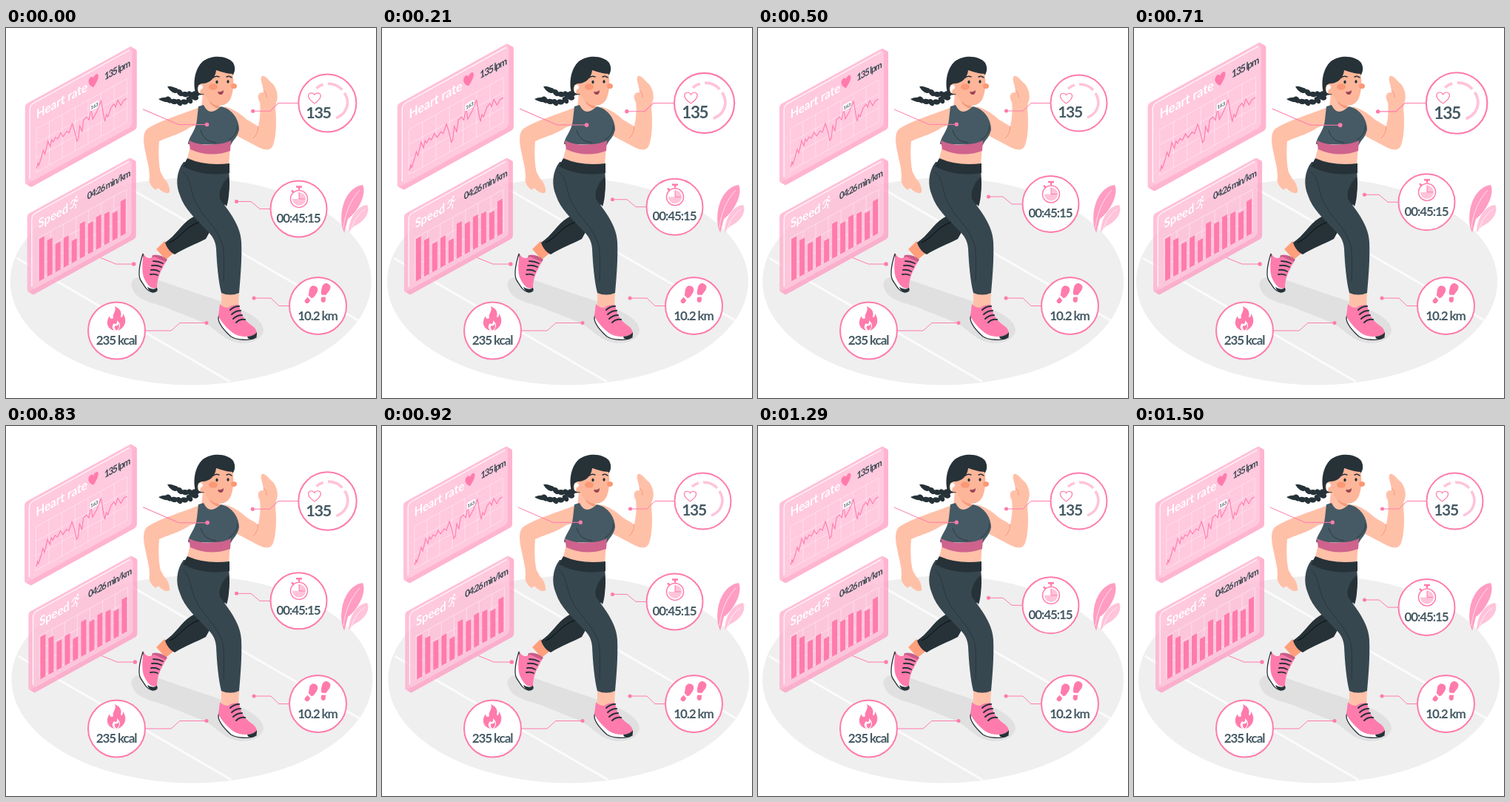
Recreate the animation shown at these times as an HTML page. Size 500 by 500 pixels, loop 1.54 s.

```html
<!DOCTYPE html>
<html lang="en">
<head>
<meta charset="utf-8">
<title>Running stats</title>
<style>
html, body { margin: 0; height: 100%; overflow: hidden; background: #fff; }
svg { display: block; width: 100%; height: 100%; }
text { font-family: Lato, "Open Sans", sans-serif; font-weight: 700; fill: #455a64; }
.title { font-size: 17px; fill: #fff; }
.value { font-size: 13px; letter-spacing: -1.3px; fill: #37474f; }
.badge text { font-size: 17px; letter-spacing: -1.1px; text-anchor: middle; }
.badge .rim { fill: #fff; stroke: #ff7bac; stroke-width: 2; }
.lead { fill: none; stroke: #ff7bac; }
.pink, .dot { fill: #ff7bac; }
.skin { fill: #ffc0a8; }
.dark { fill: #263238; }
.line { fill: none; stroke: #263238; stroke-linecap: round; }
.grid { fill: none; stroke: #fff; stroke-width: .7; opacity: .55; }
</style>
</head>
<body>
<svg viewBox="0 0 500 500">
  <defs>
    <g id="slab">
      <path d="M4 4H158L165 11V109H11L4 102z" fill="#ff9ac0" stroke="#ff9ac0" stroke-width="8" stroke-linejoin="round" opacity=".74"/>
      <rect width="162" height="106" rx="5" fill="#fff" opacity=".16"/>
      <rect x="7" y="4" width="155" height="102" rx="6" fill="#fff" opacity=".14"/>
      <path d="M7 101V10Q7 4 13 4H158" fill="none" stroke="#fff" stroke-width="1.5" opacity=".85"/>
      <path class="grid"/>
    </g>
    <path id="heart" d="M0 7C-9 0-7-6-3.5-6-1.5-6 0-4.5 0-3 0-4.5 1.5-6 3.5-6 7-6 9 0 0 7z"/>
    <g id="print">
      <path d="M-5-9C-1-13 6-11 5-3 4 3 4 5 1 6L-4 4C-4 0-8-4-5-9z"/>
      <path d="M-4 7L1 9C1 14-1 16-4 15-7 13-5 10-4 7z"/>
    </g>
  </defs>

  <g class="shake">
    <ellipse cx="250" cy="342.5" rx="244" ry="140" fill="#efefef"/>
    <path d="M15 311L303 478M156 210L476 395" stroke="#fff" stroke-width="3" opacity=".8"/>
  </g>
  <path d="M170 350C166 336 186 333 204 340L262 360C300 372 350 388 348 410 342 428 316 429 300 421 286 413 278 402 262 396L212 376C192 370 174 366 170 350z" fill="#e0e0e0"/>

  <g>
    <path d="M454 268C450 240 462 215 482 212 488 224 476 248 462 258L457 277z" fill="#ff9dc2"/>
    <path d="M463 276C464 256 474 241 488 239 493 249 484 262 470 268z" fill="#ffc3da"/>
    <path d="M456 270C458 250 466 232 478 219M466 273C470 260 476 251 485 245" fill="none" stroke="#fff" stroke-width=".8" opacity=".8"/>
  </g>

  <g class="shake">
    <g transform="matrix(.87 -.48 0 1 29 252)">
      <use href="#slab"/>
      <g id="bars" class="pink"></g>
      <text class="title" x="17" y="27">Speed</text>
      <g transform="translate(73 19) scale(.85)" fill="none" stroke="#fff" stroke-width="1.7" stroke-linecap="round" stroke-linejoin="round">
        <path d="M-6-1L-3-5 2-4 4 0 7-1M2-4L-1 2 3 5 2 10M-1 2L-3 6-7 6"/>
        <circle cx="4" cy="-7" r="1"/>
      </g>
      <text class="value" x="93" y="25">04:26 min/km</text>
    </g>
  </g>

  <!-- Runner -->
  <g>
    <path d="M203 299L214 288 228 303 216 313z" fill="#ff9f7c"/>
    <path d="M198 307Q208 305 218 313L211 323 194 319z" fill="#c95d88"/>
    <path d="M185 305C181 318 178 334 182 341 187 348 190 356 198 357 204 357 206 354 202 350L190 330z" fill="#fff" stroke="#263238" stroke-width="1.3"/>
    <path class="pink" d="M186 305C189 312 195 312 200 309L216 316C210 327 204 337 204 351 196 354 191 347 187 339 183 331 184 316 186 305z"/>
    <path class="dark" d="M191 350Q199 355 204 351 205 357 198 357 193 356 191 350z"/>
    <path class="line" d="M199 315Q206 315 212 318M197 321Q204 320 210 323M196 327Q202 326 207 329M195 333Q200 332 205 334" stroke-width="1.8"/>
    <path class="dark" d="M300 190C304 210 302 228 295 240L270 285C257 292 242 297 228 306 222 303 217 297 215 290 230 280 236 266 250 257L262 250 270 190z"/>
    <path d="M221 290C237 283 240 270 262 262" fill="none" stroke="#000" stroke-width=".8"/>

    <path class="skin" d="M291 355H315L314 379 302 386 291 374z"/>
    <path d="M288 388C284 396 294 408 304 417 312 422 330 423 338 418L337 411 300 402z" fill="#fff" stroke="#263238" stroke-width="1.3"/>
    <path class="pink" d="M289 373C294 378 300 380 305 375L315 374C317 387 322 395 332 402 338 406 340 411 338 414 330 418 316 418 308 413 298 406 290 396 287 389z"/>
    <path class="dark" d="M326 417Q336 416 339 411 340 419 332 421 327 421 326 417z"/>
    <path class="line" d="M303 381Q308 376 315 376M305 387Q310 382 317 382M307 393Q312 388 319 388M311 398Q316 393 323 394" stroke-width="2"/>
    <path d="M240 181C230 194 229 212 235 226 241 245 256 257 268 270 277 279 283 285 284 298 285 320 287 342 291 358Q303 363 315 358C317 336 319 311 318 289 317 268 304 251 289 231 288 224 293 214 301 204L302 184z" fill="#37474f"/>
    <path class="dark" d="M301 201C290 211 286 226 290 232L298 241C302 230 302 214 301 201z"/>
    <path class="line" d="M239 194C251 203 249 224 258 239 270 260 292 275 294 302Q295 320 294 342" stroke-width=".8"/>
    <path class="skin" d="M249 160L303 160 301 186Q272 192 245 177z"/>
    <path class="dark" d="M245 176Q270 187 302 183L302 196Q268 202 239 187z"/>

    <path class="skin" d="M264 106C240 116 204 126 190 137 184 144 186 156 188 166 191 181 194 190 194 202 192 209 197 215 201 218 203 220 205 216 206 216 210 221 217 225 221 222 222 217 219 208 214 204L209 195C206 184 206 166 207 153 220 147 236 143 249 134L266 129z"/>
    <path class="skin" d="M292 106C305 107 317 116 326 124L341 133C344 118 344 110 343 100 339 94 340 86 348 87 348 78 342 68 346 65 350 63 356 72 361 76 366 82 369 94 365 101L364 108C366 128 365 146 361 158 358 167 349 165 341 161L307 143z"/>
    <path d="M341 133Q340 144 334 149M348 84Q353 88 352 94" fill="none" stroke="#f49a7b"/>

    <path class="skin" d="M266 88L289 98 289 109Q283 122 272 116L264 107z"/>
    <path d="M260 106L267 104Q275 121 290 106C306 109 315 124 315 137 313 148 306 152 304 158L246 157C246 148 257 139 258 124z" fill="#455a64"/>
    <path d="M247 152Q264 160 282 157 294 157 304 152L303 166Q276 176 249 164z" fill="#cf638d"/>
    <path class="line" d="M263 138Q267 154 284 155M313 132Q312 146 301 151" stroke-width=".8"/>

    <g class="dark" id="braids"></g>
    <path class="dark" d="M257 91C252 77 254 56 266 45 280 35 300 38 307 47 311 54 309 62 305 65L268 90z"/>
    <path d="M284 57C291 59 299 62 306 62 308 70 308 82 305 91 302 103 293 106 286 104 277 102 270 96 267 89 257 91 256 76 265 75 276 75 283 67 284 57z" fill="#fdb699"/>
    <ellipse cx="280" cy="79.5" rx="6" ry="4.3" fill="#fb9876"/>
    <ellipse cx="308" cy="78.5" rx="4" ry="3.5" fill="#fb9876"/>
    <ellipse class="dark" cx="285" cy="73" rx="1.7" ry="2.2"/>
    <ellipse class="dark" cx="300" cy="72.5" rx="1.6" ry="2.2"/>
    <path class="line" d="M280 67Q284 64 288 66M298 66Q302 64 305 67" stroke-width="1.5"/>
    <path d="M286 86Q291 87 294 84 294 90 290 90 287 90 286 86z" fill="#9c4257"/>
    <path d="M274 98Q280 104 288 105L287 109Q277 106 274 98z" fill="#f49a7b"/>
    <path d="M260 78Q264 75 266 79 266 83 263 83L262 88 260 87z" fill="#fff"/>
  </g>

  <!-- Heart rate panel -->
  <g class="pulse" data-center="148.5 119.5">
    <g transform="matrix(.87 -.48 0 1 29 104)">
      <use href="#slab"/>
      <text class="title" x="17" y="27">Heart rate</text>
      <use href="#heart" class="pink" transform="translate(103.5 18.6) scale(1.15)"/>
      <text class="value" x="120" y="25.7">135 lpm</text>
    </g>
    <polyline fill="none" stroke="#ff7bac" stroke-width="1.1" points="44,188 46,181 47,184 50,175 53,164 55,169 57,161 59,152 62,159 64,150 66,153 69,147 72,149 76,141 79,146 84,139 87,141 91,129 94,138 97,152 99,149 101,132 104,139 106,124 110,120 113,124 116,109 118,123 123,114 129,99 132,116 134,126 136,117 138,120 142,108 146,103 148,107 151,98 155,105 159,98 163,96"/>
    <g transform="matrix(.87 -.48 0 1 29 104)">
      <rect x="98.500" y="47.500" width="13" height="9" rx="1" fill="#fff"/>
      <text x="105" y="54.500" font-size="6.500" text-anchor="middle">163</text>
    </g>
    <path class="lead" d="M184 110L231 130.300H268"/>
    <circle class="dot" cx="268.300" cy="130.300" r="2.700"/>
  </g>

  <g class="shake">
    <path class="lead" d="M128 310.500L149 319H173"/>
    <circle class="dot" cx="173" cy="319" r="2.700"/>
  </g>

  <g class="badge pulse" data-center="403.5 101.5">
    <path class="lead" d="M335.500 112H358L369 101.500H395"/>
    <circle class="dot" cx="335.500" cy="112" r="2.500"/>
    <circle class="rim" cx="433.500" cy="101.500" r="38"/>
    <path d="M419 82Q423 78.500 428 77M434 76Q446 76 453 84M456 88Q464 101 456 113 452 118 445 121" fill="none" stroke="#ffc3da" stroke-width="3.500"/>
    <use href="#heart" transform="translate(416.500 94.500) scale(1.25 1.05)" fill="#fff" stroke="#ff7bac"/>
    <text x="421.500" y="121" style="font-size:21px;letter-spacing:-1.3px">135</text>
  </g>

  <g class="badge" id="timer">
    <path class="lead" d="M311.500 235H331L343 245H357"/>
    <circle class="dot" cx="311.500" cy="235" r="2.500"/>
    <circle class="rim" cx="395.500" cy="245" r="38"/>
    <g fill="none" stroke="#ff7bac" stroke-width="1.500">
      <circle cx="396" cy="231.500" r="11.500" fill="#fff"/>
      <path d="M396 219V215M392 215H400M386 220L389 223" stroke-width="2.500"/>
    </g>
    <path d="M396 231.500V222.500A9 9 0 1 1 387 231.500z" fill="#ffc3da"/>
    <path class="lead" d="M396 222.500V231.500H404"/>
    <text x="395" y="263.500">00:45:15</text>
  </g>

  <g class="badge">
    <path class="lead" d="M335 365H358L369 375.500H383"/>
    <circle class="dot" cx="335" cy="365" r="2.500"/>
    <circle class="rim" cx="421.500" cy="375.500" r="38.500"/>
    <g class="pink">
      <use href="#print" transform="translate(414 359) rotate(24)"/>
      <use href="#print" transform="translate(430.500 355.500) rotate(20) scale(-1 1)"/>
    </g>
    <text x="421" y="395">10.2 km</text>
  </g>

  <g class="badge">
    <path class="lead" d="M188 409H223L235 398.500H271"/>
    <circle class="dot" cx="271" cy="398.500" r="2.500"/>
    <circle class="rim" cx="149.500" cy="409" r="38.500"/>
    <path class="pink" d="M147 376C157 380 156 387 155 391 158 391 158 388 158 386 164 394 162 405 151 409 157 402 153 398 150 395 151 400 148 401 146 399 142 403 144 407 147 409 137 407 134 398 140 389 140 393 143 394 145 392 143 386 150 383 147 376z"/>
    <path class="pink" d="M149 409Q145 404 148 402 152 403 152 399 155 405 149 409z"/>
    <text x="149" y="428">235 kcal</text>
  </g>
</svg>
<script>
const LOOP = 1540, STEPS = 37;
const all = selector => [...document.querySelectorAll(selector)];

let grid = "";
for (let i = 0; i < 8; i++) grid += `M${17 + i * 19.6} 40V97`;
for (let i = 0; i < 4; i++) grid += `M17 ${40 + i * 19}H154`;
document.querySelector(".grid").setAttribute("d", grid);

document.getElementById("bars").innerHTML = [57, 49, 38, 40, 30, 47, 41, 44, 42, 37, 47]
  .map((h, i) => `<rect x="${18.4 + i * 12.65}" y="${99 - h}" width="8" height="${h}"/>`).join("");

// Each braid is a sagging row of tilted knots ending in a tuft.
const braid = (x, y, dx, dy, sag, n) => Array.from({ length: n }, (_, i) => {
  const cx = x + dx * i, cy = y + dy * i + sag * Math.sin(i / (n - 1) * Math.PI);
  return `<ellipse cx="${cx}" cy="${cy}" rx="5.2" ry="3.6" transform="rotate(${i % 2 ? 50 : 10} ${cx} ${cy})"/>`;
}).join("");
document.getElementById("braids").innerHTML =
  braid(256, 89, -7, -1.2, 3, 5) + braid(255, 94, -7, .6, 5, 6) +
  `<path d="M231 83Q225 78 218 79 222 87 230 88zM222 95Q214 92 206 96 213 101 221 100z"/>`;

// Linear interpolation between [phase, value] keys.
function track(keys, p) {
  const i = Math.max(1, keys.findIndex(key => key[0] >= p));
  const [p0, v0] = keys[i - 1], [p1, v1] = keys[i];
  return v0 + (v1 - v0) * (p - p0) / (p1 - p0);
}
const beat = [[0, 1], [.1, 1.1], [.3, 1], [.4, 1], [.5, 1.1], [.6, 1], [1, 1]];
const shake = [0, -1, 2, -4, 4, -4, 4, -4, 2, -1, 0].map((x, i) => [i / 10, x]);
const float = [[0, 0], [.5, -10], [1, 0]];

const pulsing = all(".pulse"), shaking = all(".shake"), timer = document.getElementById("timer");

function draw(now) {
  const step = Math.floor((now + 5) % LOOP / LOOP * STEPS);
  const p = (step + 1) / STEPS;
  for (const g of pulsing) {
    const [x, y] = g.dataset.center.split(" ");
    g.setAttribute("transform", `translate(${x} ${y}) scale(${track(beat, p)}) translate(${-x} ${-y})`);
  }
  for (const g of shaking) g.setAttribute("transform", `translate(${track(shake, p)} 0)`);
  timer.setAttribute("transform", `translate(0 ${track(float, p)})`);
}

let start;
function tick(now) {
  start ??= now;
  draw(now - start);
  requestAnimationFrame(tick);
}
draw(0);
requestAnimationFrame(tick);
</script>
</body>
</html>
```
